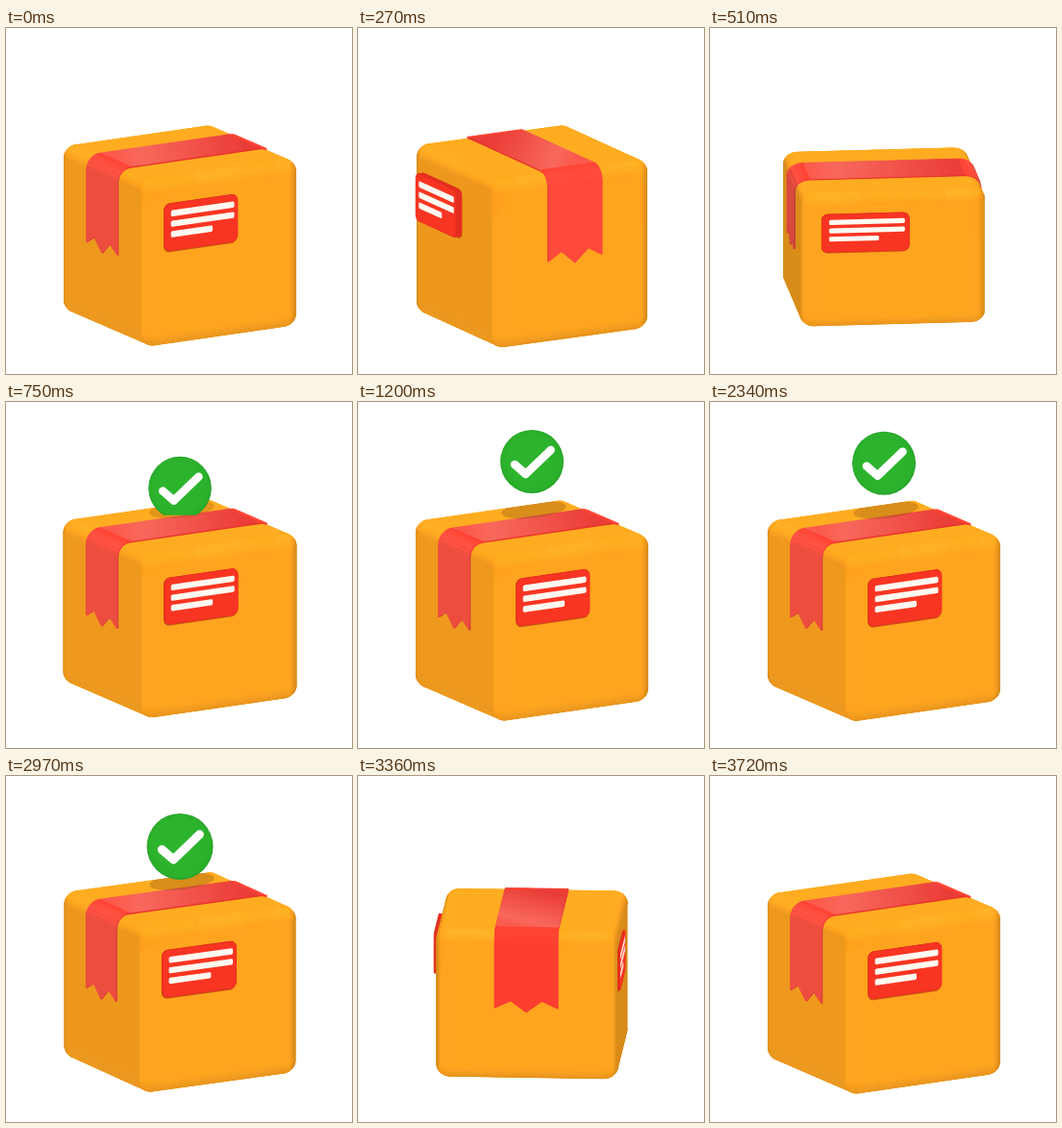
Recreate the animation shown at these times as an HTML page with a canvas. Size 360 by 360 pixels, loop 3.75 s.

```html
<!DOCTYPE html>
<html lang="en">
<head>
<meta charset="utf-8">
<title>Parcel delivered</title>
<style>
html, body { margin: 0; width: 100%; height: 100%; overflow: hidden; background: #fff; }
canvas { display: block; width: 360px; height: 360px; }
</style>
</head>
<body>
<canvas id="stage" width="360" height="360"></canvas>
<script>
const ctx = document.getElementById('stage').getContext('2d');
const LOOP = 3750, CX = 181, CY = 216;
const HALF = 92, ROUND = 14, CORE = HALF - ROUND;
const SIN_P = 0.25, COS_P = Math.sqrt(1 - SIN_P * SIN_P);
const TALL = 0.975, TAPE = 32;

// Key tables: [ms, value]
const STRETCH = [[0, 1], [170, 1.065], [400, 0.89], [510, 0.8], [595, 0.73], [780, 1],
  [2960, 1], [3190, 0.73], [3360, 0.885], [3540, 1.01], [3690, 1], [3750, 1]];
const FLOAT = [[0, 0], [510, 1.4], [780, -1], [1050, -1], [1200, 1], [1640, 4.6], [1900, 4.2],
  [2190, 2.6], [2340, 1.3], [2700, -1], [2970, -1.6], [3360, 0], [3750, 0]];
const BADGE_Y = [[600, 165], [860, 43.5], [1090, 58], [1200, 62], [1650, 65.5], [1900, 67],
  [2160, 65.8], [2340, 63.7], [2700, 58], [2840, 43], [2970, 73], [3080, 165]];
const BADGE_R = [[600, 30], [860, 34.5], [1150, 33], [2700, 33], [2840, 34.5], [3080, 34.5]];

// Smooth interpolation that rests at every turning point
function at(keys, t) {
  const last = keys.length - 1;
  if (t <= keys[0][0]) return keys[0][1];
  if (t >= keys[last][0]) return keys[last][1];
  const slope = i => (keys[i + 1][1] - keys[i][1]) / (keys[i + 1][0] - keys[i][0]);
  const tangent = i => {
    if (i === 0 || i === last) return 0;
    const a = slope(i - 1), b = slope(i);
    return a * b <= 0 ? 0 : 2 * a * b / (a + b);
  };
  let i = 0;
  while (keys[i + 1][0] < t) i++;
  const [t0, v0] = keys[i], [t1, v1] = keys[i + 1];
  const d = t1 - t0, u = (t - t0) / d, w = 1 - u;
  return v0 * w * w * (1 + 2 * u) + v1 * u * u * (3 - 2 * u)
    + d * u * w * (tangent(i) * w - tangent(i + 1) * u);
}

const clamp = (v, lo, hi) => Math.max(lo, Math.min(hi, v));
const easeInOut = u => u < 0.5 ? 4 * u ** 3 : 1 - 4 * (1 - u) ** 3;
const turn = (t, start) => easeInOut(clamp((t - start) / 686, 0, 1));

let view;
function setView(t) {
  const yaw = (30 + 360 * (turn(t, 0) - turn(t, 2908))) * Math.PI / 180;
  const s = at(STRETCH, t);
  view = {
    cos: Math.cos(yaw), sin: Math.sin(yaw),
    sx: 1 + (1 - s) * 0.22, sy: s * TALL, y: CY + at(FLOAT, t)
  };
}

const spin = ([x, y, z]) => [x * view.cos + z * view.sin, y, z * view.cos - x * view.sin];

function project(p) {
  const [x, y, z] = spin(p);
  return [CX + x * view.sx, view.y + y * view.sy * COS_P + z * view.sx * SIN_P];
}

function faces(n) {
  const [, y, z] = spin(n);
  return z / view.sx * COS_P - y / view.sy * SIN_P > 0;
}

function shade(base, n) {
  const [x, y, z] = spin(n);
  const left = Math.max(0, -x - 0.6) / 0.4, right = Math.max(0, x - 0.6) / 0.4;
  const up = Math.max(0, -y);
  const k = 1 - 0.15 * left * left - 0.15 * right - 0.1 * Math.max(0, y)
    + 0.05 * up + 0.1 * up * Math.max(0, z);
  return `rgb(${base.map(c => clamp(Math.round(c * k), 0, 255))})`;
}

function poly(points, color, seam = 0.8) {
  ctx.beginPath();
  points.forEach(p => ctx.lineTo(...project(p)));
  ctx.closePath();
  ctx.fillStyle = ctx.strokeStyle = color;
  ctx.fill();
  if (seam) {
    ctx.lineWidth = seam;
    ctx.stroke();
  }
}

// Rounded cube as six grids that bend at the rim
const STEPS = 6;
const rim = Array.from({ length: STEPS + 1 }, (_, i) => CORE + ROUND * Math.tan(i / STEPS * Math.PI / 4));
const grid = [...rim.map(v => -v).reverse(), ...rim];
const AXES = [
  (u, v, s) => [u, v, s],
  (u, v, s) => [s, u, v],
  (u, v, s) => [v, s, u]
];

function bend(p) {
  const core = p.map(v => clamp(v, -CORE, CORE));
  const d = p.map((v, i) => v - core[i]);
  const len = Math.hypot(...d);
  const n = d.map(v => v / len);
  return { p: core.map((v, i) => v + n[i] * ROUND), n };
}

const cube = [];
for (const axis of AXES) for (const side of [-HALF, HALF]) {
  for (let i = 0; i < grid.length - 1; i++) for (let j = 0; j < grid.length - 1; j++) {
    const spot = (a, b) => bend(axis(a, b, side));
    const [u0, u1, v0, v1] = [grid[i], grid[i + 1], grid[j], grid[j + 1]];
    cube.push({
      n: spot((u0 + u1) / 2, (v0 + v1) / 2).n,
      points: [spot(u0, v0), spot(u1, v0), spot(u1, v1), spot(u0, v1)].map(s => s.p)
    });
  }
}

const ORANGE = [255, 164, 31], RED = [253, 62, 47], EDGE_RED = [232, 48, 42];
const LAYERS = [0.5, 1.2, 1.9];

function drawCube() {
  for (const q of cube) if (faces(q.n)) poly(q.points, shade(ORANGE, q.n));
}

// The tape is glossier when seen from the side
function tapeColor(lift, n) {
  const sheen = 24 * Math.abs(spin(n)[0]);
  const [r, g, b] = lift > 1.5 ? RED : EDGE_RED;
  return shade([r, g + sheen, b + sheen], n);
}

function tapeBend(side, lift, from, to) {
  const spot = (a, z) => [side * (CORE + (ROUND + lift) * Math.sin(a)), -CORE - (ROUND + lift) * Math.cos(a), z];
  const step = Math.PI / 12;
  for (let i = from; i < to; i++) {
    const a = i * step, b = a + step, m = a + step / 2;
    const n = [side * Math.sin(m), -Math.cos(m), 0];
    if (faces(n)) poly([spot(a, -TAPE), spot(a, TAPE), spot(b, TAPE), spot(b, -TAPE)], tapeColor(lift, n));
  }
}

function tapeTop() {
  const gloss = ctx.createLinearGradient(...project([-CORE, -HALF, 0]), ...project([CORE, -HALF, 0]));
  gloss.addColorStop(0, '#fb5a4c');
  gloss.addColorStop(0.2, '#f8685c');
  gloss.addColorStop(1, '#ea3d37');
  for (const lift of LAYERS) {
    const y = -HALF - lift;
    poly([[-CORE, y, -TAPE], [CORE, y, -TAPE], [CORE, y, TAPE], [-CORE, y, TAPE]],
      lift > 1.5 ? gloss : `rgb(${EDGE_RED})`);
    tapeBend(-1, lift, 0, 4);
    tapeBend(1, lift, 0, 4);
  }
}

function tapeFlap(side) {
  const teeth = [[TAPE, 2], [TAPE / 2, -7], [0, 7], [-TAPE / 2, -7], [-TAPE, 2]];
  for (const lift of LAYERS) {
    const x = side * (HALF + lift);
    tapeBend(side, lift, 4, 6);
    poly([[x, -CORE, -TAPE], [x, -CORE, TAPE], ...teeth.map(([z, y]) => [x, y, z])],
      tapeColor(lift, [side, 0, 0]));
  }
}

function roundRect(x0, y0, x1, y1, r) {
  const out = [];
  [[x1 - r, y1 - r], [x0 + r, y1 - r], [x0 + r, y0 + r], [x1 - r, y0 + r]].forEach(([x, y], k) => {
    for (let i = 0; i <= 4; i++) {
      const a = (k + i / 4) * Math.PI / 2;
      out.push([x + r * Math.cos(a), y + r * Math.sin(a)]);
    }
  });
  return out;
}

function label(side, depth) {
  const place = (points, lift) => points.map(([x, y]) => [side * x, y, side * (HALF + lift)]);
  const body = roundRect(-72, -65, 15, -14, 6);
  if (faces([0, 0, side])) poly(place(roundRect(-72, -64, 15, -12, 6), 0), '#cf4a14');
  for (let lift = 0; lift < depth; lift += 0.6) poly(place(body, lift), '#e43020');
  if (!faces([0, 0, side])) return;
  poly(place(body, depth), '#f83522', 0);
  [[-54.5, 11], [-43, 11], [-31.5, -15]].forEach(([y, end]) =>
    poly(place(roundRect(-65, y - 3.4, end, y + 3.4, 1.8), depth), '#fffaf0', 0));
}

function parcel() {
  const parts = [
    { n: [0, 0, 1], draw: () => label(1, 2) },
    { n: [0, 0, -1], draw: () => label(-1, 7) },
    { n: [-1, 0, 0], draw: () => tapeFlap(-1) },
    { n: [1, 0, 0], draw: () => tapeFlap(1) }
  ];
  parts.filter(p => !faces(p.n)).forEach(p => p.draw());
  drawCube();
  tapeTop();
  parts.filter(p => faces(p.n)).forEach(p => p.draw());
}

function badge(t) {
  if (t <= 600 || t >= 3080) return;
  const y = at(BADGE_Y, t), r = at(BADGE_R, t);
  const lid = view.y - HALF * view.sy * COS_P - 12;

  ctx.save();
  ctx.globalCompositeOperation = 'source-atop';
  ctx.globalAlpha = clamp((125 - y) / 45, 0, 1) * 0.32;
  ctx.fillStyle = '#8a4a08';
  ctx.beginPath();
  ctx.ellipse(183, lid - 6, 34, 8.5, -0.11, 0, Math.PI * 2);
  ctx.fill();
  ctx.restore();

  ctx.save();
  ctx.beginPath();
  ctx.rect(0, 0, 360, lid);
  ctx.clip();
  ctx.translate(CX, y);
  ctx.scale(r / 33, r / 33);
  const green = ctx.createRadialGradient(-3, -3, 20, 0, 0, 33);
  green.addColorStop(0, '#2db42d');
  green.addColorStop(0.85, '#2bb02b');
  green.addColorStop(1, '#259f28');
  ctx.fillStyle = green;
  ctx.beginPath();
  ctx.arc(0, 0, 33, 0, Math.PI * 2);
  ctx.fill();
  ctx.strokeStyle = '#fff';
  ctx.lineWidth = 8.6;
  ctx.lineCap = ctx.lineJoin = 'round';
  ctx.beginPath();
  ctx.moveTo(-18, 3);
  ctx.lineTo(-6.5, 13);
  ctx.lineTo(19.5, -12);
  ctx.stroke();
  ctx.restore();
}

function frame() {
  const t = performance.now() % LOOP;
  setView(t);
  ctx.clearRect(0, 0, 360, 360);
  parcel();
  badge(t);
  requestAnimationFrame(frame);
}
frame();
</script>
</body>
</html>
```
